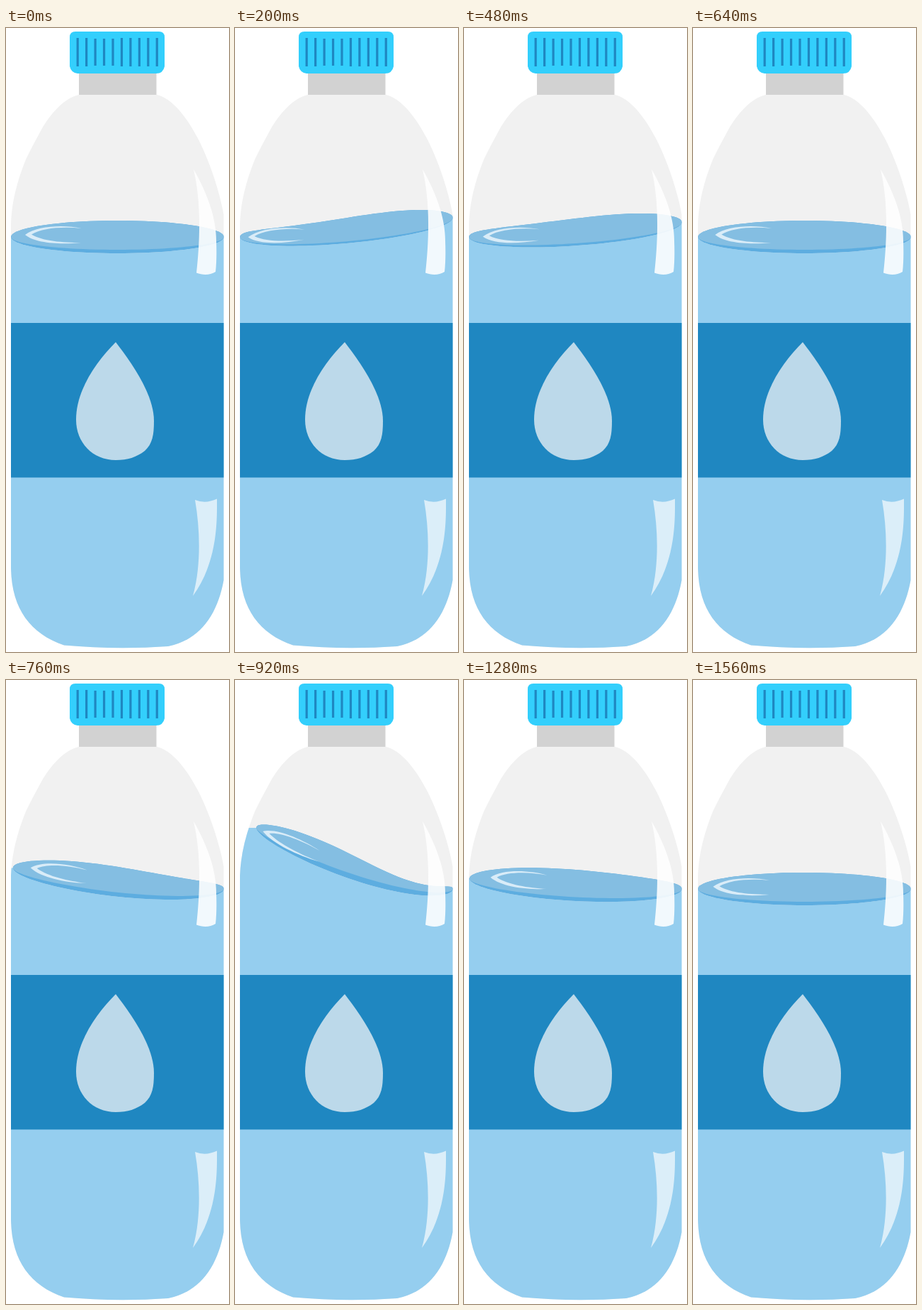
Animation of 315x878 px, one loop 1600 ms. Source, as an HTML page:

```html
<!DOCTYPE html>
<html lang="en">
<head>
<meta charset="utf-8">
<title>Water bottle</title>
<style>
html, body { margin: 0; width: 100%; height: 100%; overflow: hidden; background: #fff; }
svg { display: block; width: 100%; height: 100%; }
</style>
</head>
<body>
<svg viewBox="0 0 315 878">
  <defs>
    <clipPath id="inside">
      <path id="body" d="M103 94C82 98 62 122 50 143C42 158 35 170 28 185C17 212 8 243 7 275V757C7 815 33 852 82 868.5Q155 875 229 870C275 861 299 824 307.5 777V263C303 235 290 193 272 157C262 138 240 100 213 94Z"/>
    </clipPath>
  </defs>
  <rect x="103" y="60" width="109.5" height="34.5" fill="#d2d2d2"/>
  <path d="M98 5H216Q224 5 224 13V54Q222 64 212 64H101Q92 63 90 54V13Q90 5 98 5Z" fill="#33cffc"/>
  <path id="ribs" stroke="#1f87c1" stroke-width="3.2"/>
  <use href="#body" fill="#f1f1f1"/>
  <g clip-path="url(#inside)">
    <path id="water" fill="#95ceef"/>
    <path id="rim" fill="#5dade0"/>
    <path id="top" fill="#84bee2"/>
    <path id="glint" fill="#d9ecf8"/>
    <rect x="7" y="415" width="301" height="217.5" fill="#1f87c1"/>
  </g>
  <path d="M155 442C175 468 209 514 209 553C209 572 207 585 196 595C184 604 172 608 155 608C122 608 99 583 99 551C99 510 127 470 155 442Z" fill="#bcd9ea"/>
  <path d="M265 199C280 225 297 262 297 300Q298 325 296 343C288 348 278 348 269 344.500C274 300 276 245 265 199Z" fill="#fff" opacity=".88"/>
  <path d="M267 664Q282 670 298 662.500C298 690 300 750 264 799C275 760 275 710 267 664Z" fill="#fff" opacity=".66"/>
</svg>
<script>
const LOOP = 1600, STEP = 40, N = 48;
const $ = id => document.getElementById(id);
const draw = (id, d) => $(id).setAttribute('d', d);
const clamp = x => Math.min(1, Math.max(0, x));

function bezier(x1, y1, x2, y2) {
  const at = (s, a, b) => 3 * s * (1 - s) * (1 - s) * a + 3 * s * s * (1 - s) * b + s * s * s;
  return x => {
    let lo = 0, hi = 1;
    for (let i = 0; i < 24; i++) {
      const mid = (lo + hi) / 2;
      if (at(mid, x1, x2) < x) lo = mid; else hi = mid;
    }
    return at(lo, y1, y2);
  };
}
const smooth = bezier(.37, 0, .63, 1);
const settle = bezier(.25, .1, .25, 1);

// Rise from a to peak b, then fall back by c
const swing = (t, a, b, c, fall) => t < b
  ? smooth(clamp((t - a) / (b - a)))
  : 1 - fall(clamp((t - b) / (c - b)));

function drift(t) {
  if (t < 200) return -8.5 * t / 200;
  if (t < 1080) return -8.5 + 25.5 * (t - 200) / 880;
  return 17 * (LOOP - t) / 520;
}

function surface(left, right) {
  const x0 = 7 + 23 * left * left;
  const inset = 5 + 3 * left - 4 * right;
  const back = [], front = [], inner = [];
  for (let i = 0; i <= N; i++) {
    const a = Math.PI * i / N;
    const v = (1 - Math.cos(a)) / 2, s = Math.sin(a), w = 1 - v;
    const x = (x0 + (308 - x0) * v).toFixed(2);
    const base = 294 - 86 * left * w ** 1.3 - 50 * right * v ** .95;
    const bump = 190 * left * v ** 3 * w + 150 * right * v * w * w;
    const point = y => x + ' ' + y.toFixed(2);
    back.push(point(base - 23 * s + bump));
    front.unshift(point(base + 23 * s));
    inner.unshift(point(base + (23 - inset) * s));
  }
  const edge = back.join('L');
  const [, yl] = back[0].split(' ');
  draw('water', `M0 ${yl}L${front.slice().reverse().join('L')}L315 294V878H0Z`);
  draw('rim', `M${edge}L${front.join('L')}Z`);
  draw('top', `M${edge}L${inner.join('L')}Z`);
}

function glint(left, right, dx) {
  const place = (x, y, r, k) => {
    const w = (x - 27) / 80;
    const dy = -(78 - k * w) * left + (6 + (r - 6) * w) * right;
    return `${(x + dx).toFixed(2)} ${(y + dy).toFixed(2)} `;
  };
  const up = (x, y) => place(x, y, 3, 36);
  const low = (x, y) => place(x, y, -8, 32);
  draw('glint', 'M' + up(107, 282) + 'C' + up(82, 276.5) + up(44, 278) + up(27, 291)
    + 'C' + low(42, 303) + low(76, 305) + low(106, 302)
    + 'C' + low(80, 302) + low(52, 300) + low(36, 290.5)
    + 'C' + up(50, 281.5) + up(80, 279) + up(107, 282) + 'Z');
}

function render(time) {
  const t = Math.floor(time % LOOP / STEP) * STEP;
  const right = swing(t, 0, 380, 560, smooth);
  const left = swing(t, 652, 922, LOOP, settle);
  surface(left, right);
  glint(left, right, drift(t));
}

let ribs = '';
for (let i = 0; i < 10; i++) {
  const cut = i > 1 && i < 5 ? 1 : 0;
  ribs += `M${101.2 + 12.45 * i} ${14 + cut}V${54 - cut}`;
}
draw('ribs', ribs);

let start;
function tick(now) {
  start ??= now;
  render(now - start);
  requestAnimationFrame(tick);
}
render(0);
requestAnimationFrame(tick);
</script>
</body>
</html>
```
